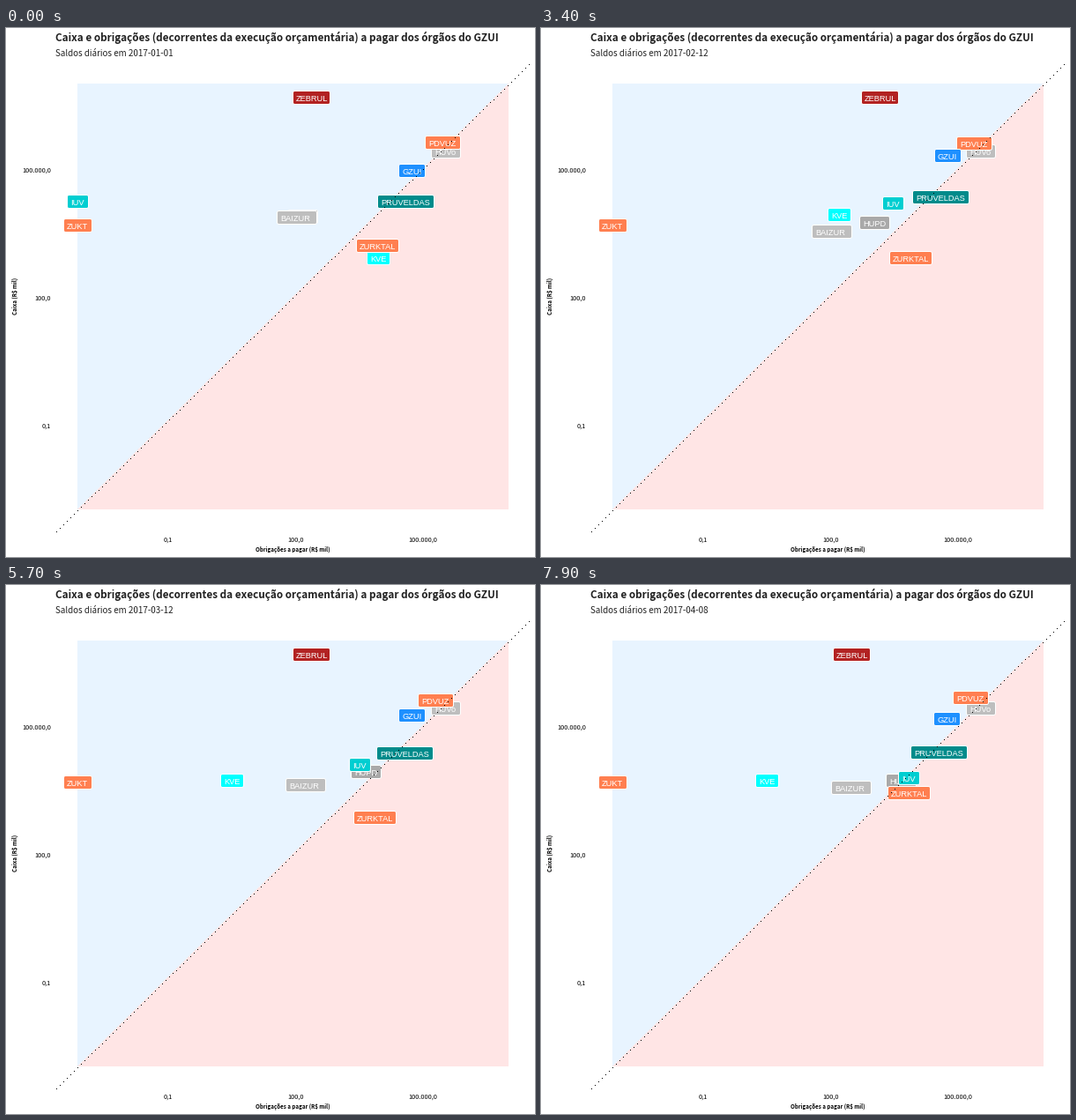
A matplotlib script for the animation above (8 s loop, 600 by 600 pixels).

```python
import matplotlib.pyplot as plt
import numpy as np
from matplotlib.animation import FuncAnimation
from matplotlib.patches import FancyBboxPatch, Polygon

SIZE, FRAMES, STEP = 600, 80, 100
PX = 0.72  # points per pixel at 100 dpi
DAYS = 97
START = np.datetime64("2017-01-01")
SANS = "Noto Sans CJK JP"
CORAL, GRAY = "#FF7F50", "#BEBEBE"

fig = plt.figure(figsize=(6, 6), dpi=100, facecolor="white")
ax = fig.add_axes([0, 0, 1, 1])
ax.set_xlim(0, SIZE)
ax.set_ylim(SIZE, 0)
ax.axis("off")


def write(x, y, s, size, **kw):
    kw = {"family": SANS, "color": "black", **kw}
    return ax.text(x, y, s, fontsize=size * PX, **kw)


def date_at(i):
    return START + int(round(i * DAYS / (FRAMES - 1)))


def swell(date):
    """Grows from 0 to 1 late in the month, drops back on the first."""
    day = (date - date.astype("M8[M]")).astype(int) + 1
    return np.clip((day - 17) / 11, 0, 1)


class Label:
    """Tag that follows a few (frame, x, y) stops plus a month-end push."""
    count = 0

    def __init__(self, name, color, width, *stops, push=(0, 0)):
        Label.count += 1
        z = 2 + Label.count / 10
        self.width, self.push = width, push
        self.keys, self.xs, self.ys = zip(*stops)
        self.box = FancyBboxPatch(
            (0, 0), width + 1, 15, boxstyle="round,pad=0,rounding_size=2",
            facecolor=color, edgecolor="white", linewidth=PX, zorder=z)
        ax.add_patch(self.box)
        self.text = write(0, 0, name, 9.3, family="Liberation Sans",
                          color="white", zorder=z + 0.05)

    def move(self, i, level):
        x = np.interp(i, self.keys, self.xs) + level * self.push[0]
        y = np.interp(i, self.keys, self.ys) + level * self.push[1]
        left, top = round(x - self.width / 2), round(y - 7)
        self.box.set_x(left - 0.5)
        self.box.set_y(top - 0.5)
        self.text.set_position((left + 3, top + 11))


# Plot area split by the diagonal
a, b = (81, 546), (570, 63)
ax.add_patch(Polygon([a, (81, 63), b], color="#E8F4FF", lw=0))
ax.add_patch(Polygon([a, (570, 546), b], color="#FFE5E5", lw=0))
dots = np.arange(56, 594, 4)
ax.plot(dots + 0.5, np.round(571 - (dots - 56) * 531 / 537) + 0.5, ",",
        color="black", zorder=5)

write(56, 15, "Caixa e obrigações (decorrentes da execução orçamentária) "
      "a pagar dos órgãos do GZUI", 11.7, weight="bold", color="#222222")
subtitle = write(56, 32, "", 9.8, color="#222222")
for k, s in enumerate(["0,1", "100,0", "100.000,0"]):
    write(184 + 144.4 * k, 583, s, 7.4, ha="center")
    write(51, 454 - 145 * k, s, 7.4, ha="right")
write(325, 593, r"Obrigações a pagar (R\$ mil)", 6.2, ha="center",
      weight="bold")
write(10, 304, r"Caixa (R\$ mil)", 6.2, ha="center", va="center",
      rotation=90, weight="bold")

# Listed from back to front
labels = [
    Label("HUVo", GRAY, 32, (0, 499, 140)),
    Label("PRUVELDAS", "#008B8B", 63,
          (0, 453, 197), (34, 453, 192), (79, 452, 190)),
    Label("HUPD", "#A9A9A9", 33, (0, 336, 214), (13, 371, 238),
          (34, 379, 221), (57, 409, 212), (79, 408, 222), push=(55, 7)),
    Label("BAIZUR", GRAY, 44, (0, 330, 215), (34, 330, 231),
          (48, 383, 238), (57, 340, 227), (79, 352, 230), push=(5, 16)),
    Label("KVE", "#00FFFF", 25, (0, 422, 261), (13, 422, 250),
          (18, 81, 222), (34, 339, 212), (48, 257, 222), push=(120, -10)),
    Label("ZURKTAL", CORAL, 47, (0, 422, 247), (13, 421, 258),
          (73, 417, 266), (79, 417, 236)),
    Label("PDVUZ", CORAL, 39, (0, 496, 130), (57, 488, 131), (79, 488, 128)),
    Label("GZUI", "#1E90FF", 29,
          (0, 461, 162), (13, 462, 141), (79, 460, 152)),
    Label("IUV", "#00CED1", 23, (3, 81, 197), (13, 362, 173),
          (34, 399, 199), (57, 402, 204), (79, 418, 219), push=(31, -26)),
    Label("ZEBRUL", "#B22222", 41, (0, 346, 79), (34, 385, 79),
          (57, 346, 79), (79, 353, 79), push=(98, 0)),
    Label("ZUKT", CORAL, 31, (0, 81, 224)),
]


def draw(i):
    date = date_at(i)
    subtitle.set_text(f"Saldos diários em {date}")
    for label in labels:
        label.move(i, swell(date))
    return []


anim = FuncAnimation(fig, draw, frames=FRAMES, interval=STEP,
                     repeat=True, repeat_delay=0, blit=False)
plt.show()
```
